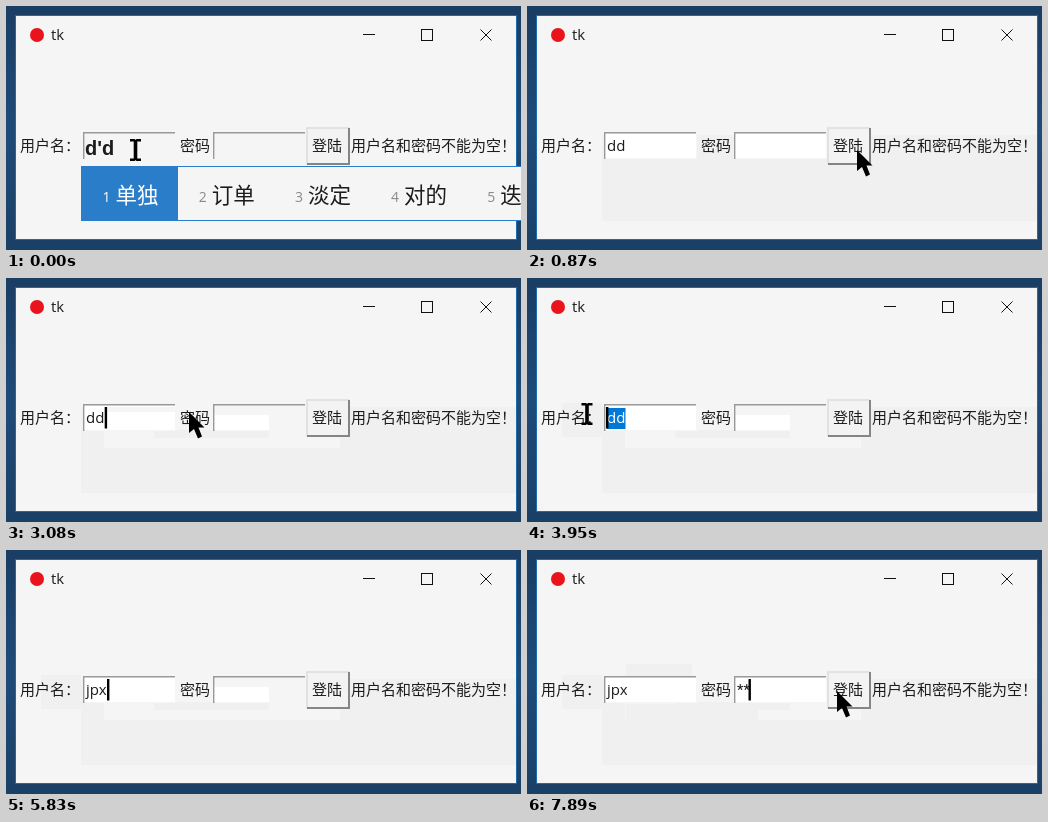
These frames come from a looping animation (515x244 px, 8 s). An HTML page:

```html
<!DOCTYPE html>
<html lang="zh">
<head>
<meta charset="utf-8">
<title>tk</title>
<style>
  html, body { margin: 0; width: 100%; height: 100%; overflow: hidden; background: #1c4269; }
  svg { display: block; width: 515px; height: 244px; }
  text { font: 15px "Open Sans", "Noto Sans CJK SC", "Noto Sans CJK", sans-serif; fill: #1c1c1c; white-space: pre; }
  .cjk { font-family: "Noto Sans CJK SC", "Noto Sans CJK", sans-serif; }
  .word { font-size: 21.5px; }
  .digit { font-size: 14px; fill: #8a8a8a; }
  .picked text { fill: #fff; }
  .compose { font: bold 20px "Liberation Sans", Arial, sans-serif; }
  .stars { font-family: Roboto, sans-serif; }
  .line { fill: none; stroke: #111; }
</style>
</head>
<body>
<svg viewBox="0 0 515 244">
  <defs>
    <linearGradient id="desk" x2="0" y2="1">
      <stop offset="0" stop-color="#1a3d63"/>
      <stop offset=".5" stop-color="#1f4b78"/>
      <stop offset="1" stop-color="#1b4066"/>
    </linearGradient>
  </defs>
  <rect width="515" height="244" fill="url(#desk)"/>
  <rect x="9" y="9" width="502" height="225" fill="#1f6aa8"/>
  <rect x="10" y="10" width="500" height="223" fill="#f5f5f5"/>
  <circle cx="31" cy="29" r="7" fill="#e8131b"/>
  <text x="45" y="34">tk</text>
  <path class="line" shape-rendering="crispEdges" d="M357 28.5h12M415.5 23.5h11v11h-11z"/>
  <path class="line" d="M474.5 23.5l11 11m0-11l-11 11"/>

  <g id="shades"></g>
  <g id="entries"></g>

  <text class="cjk" x="14" y="145">用户名：</text>
  <text class="cjk" x="174" y="145">密码</text>
  <text class="cjk" x="345" y="145">用户名和密码不能为空！</text>

  <g id="button">
    <rect x="300" y="121" width="44" height="38" fill="#f3f3f3"/>
    <path id="lit" fill="none" stroke-width="2" d="M301 158V122H343"/>
    <path id="dark" fill="none" stroke-width="2" d="M301 158H343V122"/>
    <text id="caption" class="cjk" x="306" y="145">登陆</text>
  </g>

  <rect id="select" y="130" height="21" fill="#0078d7"/>
  <text id="compose" class="compose" x="79" y="149">d'd</text>
  <text id="user" x="80" y="145"></text>
  <text id="pass" class="stars" x="210" y="145"></text>
  <rect id="caret" y="129" width="2.4" height="21.5" fill="#000"/>

  <g id="popup">
    <rect x="75.5" y="160.5" width="460" height="54" fill="#f5f5f5" stroke="#2a7dc8"/>
    <rect x="75" y="160" width="97" height="55" fill="#2a7dc9"/>
  </g>

  <path id="arrow" d="M0 1V22L5 18L9 27.500L13 25.500L9.500 16.500H15.500Z"/>
  <path id="beam" fill="none" stroke="#000" stroke-width="2.4"
        d="M-5.500 -9.800H-1.500L0 -8.500L1.500 -9.800H5.500M-5.500 9.800H-1.500L0 8.500L1.500 9.800H5.500M-.6 -9V9M.6 -9V9"/>
</svg>
<script>
const LOOP = 8000;
const $ = id => document.getElementById(id);

function add(parent, tag, attrs, text = "") {
  const el = document.createElementNS("http://www.w3.org/2000/svg", tag);
  for (const key in attrs) el.setAttribute(key, attrs[key]);
  el.textContent = text;
  return parent.appendChild(el);
}
const box = (parent, x, y, width, height, fill) =>
  add(parent, "rect", { x, y, width, height, fill });
const show = (el, on) => el.setAttribute("visibility", on ? "visible" : "hidden");

// Value of the last step reached at time t.
function at(track, t) {
  let value = track[0][1];
  for (const [start, next] of track) if (t >= start) value = next;
  return value;
}

// Repainted areas: start, end, x, y, width, height, shade
const GRAY = "#f0f0f0", PALE = "#f5f5f5", WHITE = "#fff";
const shades = [
  [270, LOOP, 75, 129, 435, 86, GRAY],
  [1750, LOOP, 98, 129, 236, 41, PALE],
  [3080, LOOP, 148, 152, 115, 8, GRAY],
  [3950, LOOP, 35, 125, 40, 34, GRAY],
  [6100, LOOP, 99, 114, 66, 38, GRAY],
  [6400, LOOP, 99, 154, 132, 25, GRAY],
].map(([from, to, ...rect]) => ({ from, to, el: box($("shades"), ...rect) }));

const fills = [
  [270, LOOP, 78, 127, 91, 25, WHITE],
  [1750, 3350, 98, 129, 71, 23, PALE],
  [3080, 3350, 98, 134, 71, 18, WHITE],
  [270, 1750, 208, 127, 91, 25, WHITE],
  [2030, LOOP, 208, 137, 55, 15, WHITE],
  [6700, 7140, 208, 129, 21, 23, PALE],
  [7140, LOOP, 208, 127, 91, 25, WHITE],
];
for (const x of [77, 207]) {
  box($("entries"), x, 126, 93, 27, PALE);
}
for (const [from, to, ...rect] of fills) {
  shades.push({ from, to, el: box($("entries"), ...rect) });
}
for (const x of [77, 207]) {
  add($("entries"), "path", {
    d: `M${x + .7} 153V126.700H${x + 92}`, fill: "none", stroke: "#999", "stroke-width": 1.4,
  });
}

["单独", "订单", "淡定", "对的", "迭"].forEach((word, i) => {
  const item = add($("popup"), "g", { class: i ? "" : "picked" });
  const x = 97 + i * 96.2;
  add(item, "text", { class: "digit", x: x - .5, y: 196 }, i + 1);
  add(item, "text", { class: "cjk word", x: x + 12.5, y: 197 }, word);
});

const A = "arrow", I = "beam";
const pointer = [
  [0, [129.5, 144, I]], [420, [160, 146, I]], [570, [215, 147, I]],
  [720, [285, 146, I]], [870, [330, 143, A]], [1600, [319, 144, A]],
  [1750, [290, 148, I]], [1880, [257.5, 149, I]], [2030, [236, 146, I]],
  [2180, [215, 141, I]], [2330, [192, 136, A]], [2480, [183, 133, A]],
  [3200, [175, 133, A]], [3350, [168, 136, I]], [3650, [140, 137, I]],
  [3800, [90, 137, I]], [3950, [60, 136, I]], [4100, [40.5, 136, I]],
  [4250, [39, 133, A]], [5830, [0, 0, ""]], [6100, [150, 114, A]],
  [6250, [190, 140, A]], [6400, [216, 153, A]], [6550, [229.5, 144, I]],
  [7440, [248, 147, I]], [7590, [276, 150, I]], [7740, [302, 140, A]],
  [7890, [310, 140, A]],
];
const caret = [
  [0, 0], [1180, 98.7], [2030, 0], [2180, 98.7], [2790, 0], [3080, 98.7],
  [3650, 0], [3800, 89], [3950, 79], [4540, 0], [4690, 79], [5000, 83.5],
  [5150, 92.5], [5420, 101], [6100, 0], [6550, 208.5], [7140, 215.500], [7290, 221.500],
];
const user = [[0, ""], [270, "dd"], [4540, ""], [5000, "j"], [5150, "jp"], [5420, "jpx"]];
const pass = [[0, ""], [7140, "*"], [7290, "**"]];
const selectFrom = [[0, 0], [3800, 89], [3950, 80], [4540, 0]];

function draw(t) {
  for (const s of shades) show(s.el, t >= s.from && t < s.to);
  show($("popup"), t < 270);
  show($("compose"), t < 270);

  const left = at(selectFrom, t), name = at(user, t);
  show($("select"), left);
  $("select").setAttribute("x", left);
  $("select").setAttribute("width", left ? 98.5 - left : 0);
  $("user").textContent = "";
  [...name].forEach((c, i) => {
    const fill = left && (i || left < 85) ? "#fff" : "#1c1c1c";
    add($("user"), "tspan", { style: `fill:${fill}` }, c);
  });
  $("pass").textContent = at(pass, t);

  const cx = at(caret, t);
  show($("caret"), cx);
  $("caret").setAttribute("x", cx);

  const pressed = t >= 1030 && t < 1180;
  $("lit").setAttribute("stroke", pressed ? "#858585" : "#e2e2e2");
  $("dark").setAttribute("stroke", pressed ? "#e2e2e2" : "#858585");
  $("caption").setAttribute("transform", pressed ? "translate(1 1)" : "");

  const [x, y, kind] = at(pointer, t);
  for (const id of [A, I]) {
    show($(id), id === kind);
    $(id).setAttribute("transform", `translate(${x} ${y})`);
  }
}

const begin = performance.now();
function tick() {
  draw((performance.now() - begin) % LOOP);
  requestAnimationFrame(tick);
}
tick();
</script>
</body>
</html>
```
